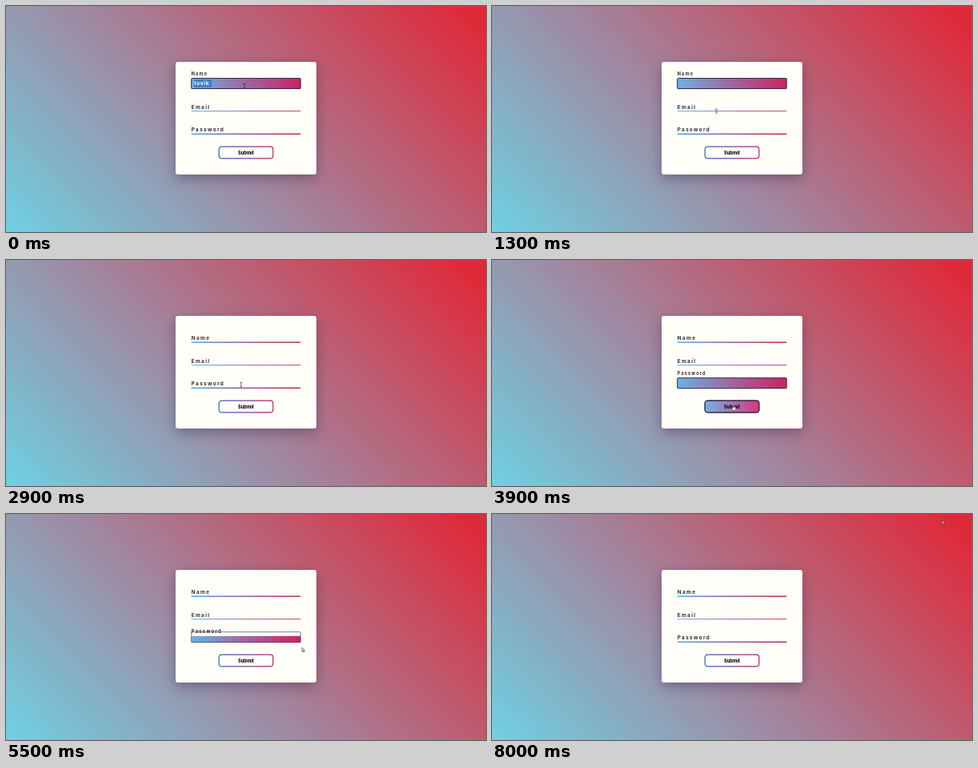
These frames come from a looping animation (600x283 px, 8.1 s). An HTML page:

```html
<!DOCTYPE html>
<html lang="en">
<head>
<meta charset="utf-8">
<title>Gradient form</title>
<style>
  /* --on runs from 0 (idle) to 1 (focused or hovered) */
  @property --on { syntax: "<number>"; inherits: true; initial-value: 0; }

  html, body { margin: 0; width: 100%; height: 100%; overflow: hidden; }
  body { background: linear-gradient(45deg, #70cfe1 1%, #a1869f 43%, #df2a3a 96%); }
  svg { display: block; width: 100%; height: 100%; }
  text { font-family: Inter, "Open Sans", sans-serif; }

  .card { fill: #fffef8; filter: drop-shadow(0 5px 8px rgba(50, 35, 75, .42)); }
  .label {
    font-size: 6.4px; font-weight: 700; letter-spacing: 1.35px; fill: #2d2b3a;
    transform: translateY(calc(var(--on) * -13.3px)) scale(calc(1 - .13 * var(--on)));
  }
  .fill { transform-origin: 0 .5px; transform: scaleY(var(--on)); }
  .ring { fill: none; stroke: #33284e; opacity: var(--on); }
  .glow { opacity: var(--on); }
  .submit { font-size: 5.7px; font-weight: 800; text-anchor: middle; fill: #0d0b14; }
  .typed { font-size: 6.4px; font-weight: 700; letter-spacing: .7px; fill: #fff; }

  .name, .email, .password, .button { animation: 8.1s linear infinite; }
  .name { animation-name: name; }
  .email { animation-name: email; }
  .password { animation-name: password; }
  .button { animation-name: button; }
  .picked { animation: picked 8.1s step-end infinite; }
  .cursor { animation: move 8.1s ease-in-out infinite; }
  .beam { animation: beam 8.1s step-end infinite; }
  .hand { animation: hand 8.1s step-end infinite; }
  .arrow { animation: arrow 8.1s step-end infinite; }

  @keyframes name { 0%, 18.5% { --on: 1; } 21.6%, 100% { --on: 0; } }
  @keyframes email { 0%, 18.5% { --on: 0; } 21.6%, 30.9% { --on: 1; } 34%, 100% { --on: 0; } }
  @keyframes password { 0%, 37.7% { --on: 0; } 40.7%, 66.7% { --on: 1; } 69.8%, 100% { --on: 0; } }
  @keyframes button { 0%, 44.4% { --on: 0; } 46.9%, 61.7% { --on: 1; } 64.2%, 100% { --on: 0; } }
  @keyframes picked { 0% { opacity: 1; } 6.2%, 100% { opacity: 0; } }

  @keyframes beam { 0% { opacity: 1; } 42%, 100% { opacity: 0; } }
  @keyframes hand { 0% { opacity: 0; } 44% { opacity: 1; } 61.7%, 100% { opacity: 0; } }
  @keyframes arrow { 0% { opacity: 0; } 42% { opacity: 1; } 44% { opacity: 0; } 61.7%, 100% { opacity: 1; } }

  @keyframes move {
    0%, 9% { transform: translate(298px, 100px); }
    16%, 20% { transform: translate(280.5px, 131.5px); }
    30% { transform: translate(285px, 140px); }
    35.8%, 39% { transform: translate(294px, 156px); }
    46% { transform: translate(302px, 182px); }
    56%, 60% { transform: translate(302px, 183.5px); }
    66% { transform: translate(368px, 169px); }
    72%, 79% { transform: translate(377.5px, 161px); }
    85.5% { transform: translate(569px, 11px); }
    89% { transform: translate(562px, 9px); }
    94% { transform: translate(561.5px, 2px); }
    98.7%, 100% { transform: translate(562.5px, 7.8px); }
  }
</style>
</head>
<body>
<svg viewBox="0 0 600 283" preserveAspectRatio="none">
  <defs>
    <linearGradient id="line" gradientUnits="userSpaceOnUse" x1="0" x2="136.5" y1="0" y2="0">
      <stop offset="0" stop-color="#3aa5e0"/>
      <stop offset=".5" stop-color="#8a4f96"/>
      <stop offset="1" stop-color="#c5125c"/>
    </linearGradient>
    <linearGradient id="wash" gradientUnits="userSpaceOnUse" x1="0" x2="136.5" y1="0" y2="0">
      <stop offset="0" stop-color="#6cb2e0"/>
      <stop offset=".5" stop-color="#a1659f"/>
      <stop offset="1" stop-color="#cb2362"/>
    </linearGradient>
    <linearGradient id="edge" gradientUnits="userSpaceOnUse" x1="0" x2="68" y1="0" y2="0">
      <stop offset="0" stop-color="#2866bd"/>
      <stop offset="1" stop-color="#c2186a"/>
    </linearGradient>
    <linearGradient id="press" gradientUnits="userSpaceOnUse" x1="0" x2="68" y1="0" y2="0">
      <stop offset="0" stop-color="#74b2de"/>
      <stop offset="1" stop-color="#d5377f"/>
    </linearGradient>
    <g id="box">
      <rect class="fill" y="-12.5" width="136.5" height="13" fill="url(#wash)"/>
      <rect class="ring" x="0" y="-12.5" width="136.5" height="13" rx="1"/>
    </g>
  </defs>

  <rect class="card" x="212" y="70" width="176" height="141" rx="3"/>

  <g transform="translate(231.7 103)">
    <g class="name">
      <rect y="-.6" width="136.5" height="1.4" fill="url(#line)"/>
      <use href="#box"/>
      <g class="picked">
        <rect x="3" y="-11" width="22.5" height="9.8" fill="#3b82c9"/>
        <text class="typed" x="3.6" y="-3.8">tovik</text>
      </g>
      <g transform="translate(0 -3)"><text class="label">Name</text></g>
    </g>
  </g>

  <g transform="translate(231.7 131.6)">
    <g class="email">
      <rect y="-.5" width="136.5" height="1" fill="url(#line)" opacity=".85"/>
      <use href="#box"/>
      <g transform="translate(0 -3)"><text class="label">Email</text></g>
    </g>
  </g>

  <g transform="translate(231.7 160.2)">
    <g class="password">
      <rect y="-.6" width="136.5" height="1.4" fill="url(#line)"/>
      <use href="#box"/>
      <g transform="translate(0 -3)"><text class="label">Password</text></g>
    </g>
  </g>

  <g transform="translate(266.2 176.2)">
    <g class="button">
      <rect width="67.6" height="14.6" rx="3.2" fill="#fffefc" stroke="url(#edge)" stroke-width="1.2"/>
      <rect class="glow" width="67.6" height="14.6" rx="3.2" fill="url(#press)" stroke="#2b2140" stroke-width="1.2"/>
      <text class="submit" x="33.8" y="9.4">Submit</text>
    </g>
  </g>

  <g class="cursor">
    <path class="beam" d="M-1.2-2.6H1.2M0-2.6V2.6M-1.2 2.6H1.2" fill="none" stroke="#2a2838" stroke-width=".7"/>
    <path class="hand" d="M-.6 0Q0-.7.6 0V2L2.6 2.6V4.6L1.9 6H-1L-2.3 3.5L-1.6 2.9L-.6 3.7Z" fill="#fff" stroke="#222" stroke-width=".4"/>
    <path class="arrow" d="M0 0V5L1.1 4L1.9 5.8L2.7 5.4L1.9 3.7H3.4Z" fill="#fff" stroke="#1c1a24" stroke-width=".6"/>
  </g>
</svg>
</body>
</html>
```
